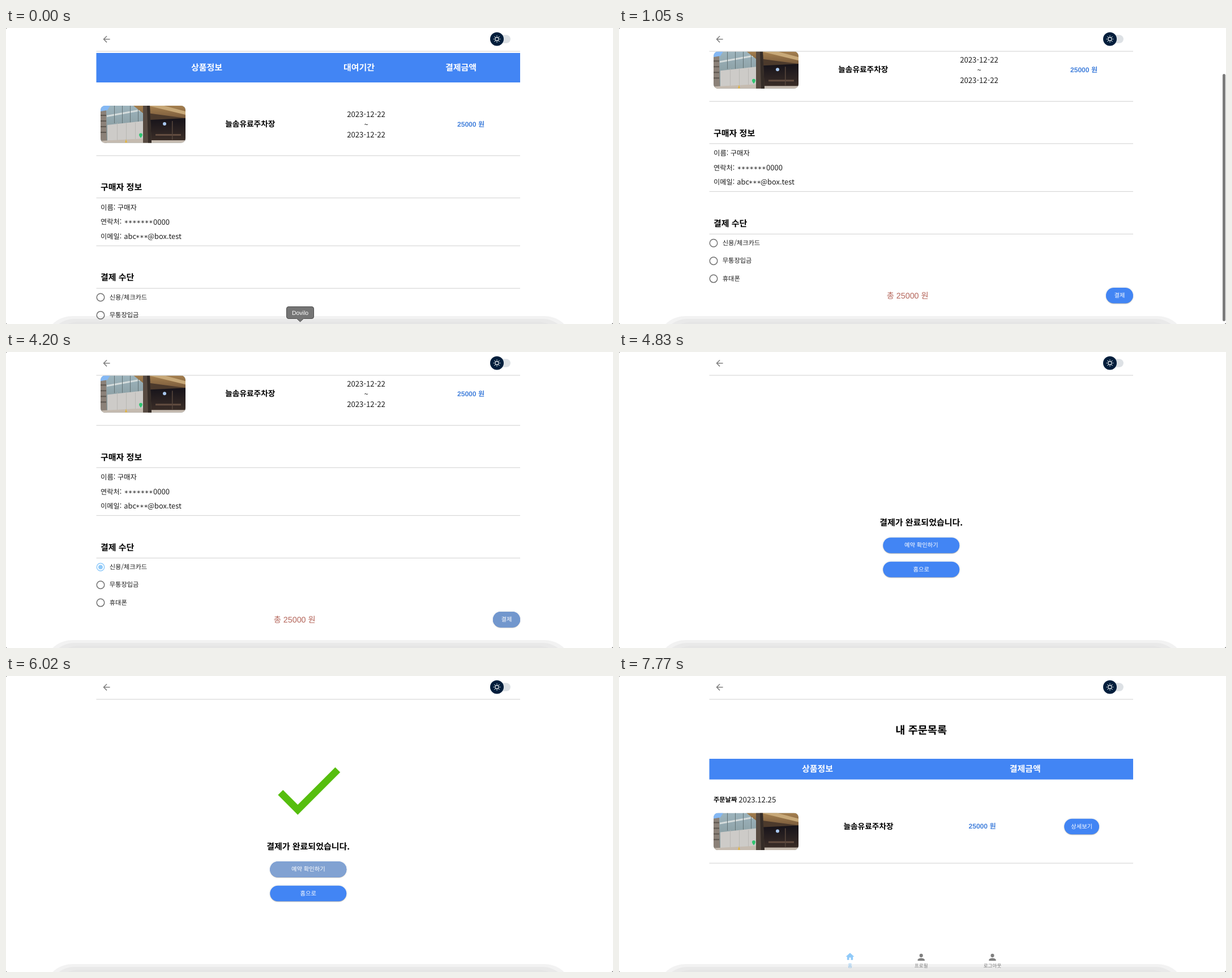
Animation, 1072 px wide and 522 px high, one loop 8 s. Source, as an HTML page:

```html
<!DOCTYPE html>
<html lang="ko">
<head>
<meta charset="utf-8">
<title>결제</title>
<style>
  html, body { margin: 0; width: 100%; height: 100%; overflow: hidden; background: #fff; }
  svg { display: block; width: 100%; height: 100%; font-family: "Noto Sans CJK KR", "Noto Sans CJK JP", "Noto Sans CJK", sans-serif; }
  text { white-space: pre; text-rendering: geometricPrecision; }
  .arial { font-family: "Liberation Sans", "Noto Sans CJK KR", sans-serif; }
  .mono { font-family: "DejaVu Sans Mono", monospace; }
  .raised { filter: drop-shadow(0 1px .6px rgba(0, 0, 0, .22)) drop-shadow(0 .7px 1.4px rgba(0, 0, 0, .16)); }
</style>
</head>
<body>
<svg id="stage" viewBox="0 0 1072 522" xmlns="http://www.w3.org/2000/svg"></svg>
<script>
const BLUE = '#4285f4', LIGHT = '#90caf9', GRAY = '#707070', PRICE = '#4582dc';
const LOT = '늘솜유료주차장';
const STEP = 70, LOOP = 8000, SCROLL = 95.7;

// Text placed by its vertical centre.
const text = (x, cy, size, str, { fill = '#1c1c1c', weight = 400, anchor = 'start', cls = '' } = {}) =>
  `<text x="${x}" y="${cy + size * .36}" font-size="${size}" fill="${fill}" font-weight="${weight}" text-anchor="${anchor}" class="${cls}">${str}</text>`;
const mid = (x, cy, size, str, opts = {}) => text(x, cy, size, str, { anchor: 'middle', ...opts });
const bold = (x, cy, size, str) => text(x, cy, size, str, { weight: 700, fill: '#000' });
const rect = (x, y, w, h, fill, rx = 0, extra = '') =>
  `<rect x="${x}" y="${y}" width="${w}" height="${h}" rx="${rx}" fill="${fill}" ${extra}/>`;
const rule = y => rect(159.5, y - .5, 748.5, 1.2, '#d8d8d8');
const icon = (cx, cy, scale, fill, d) =>
  `<path transform="translate(${cx - 12 * scale} ${cy - 12 * scale}) scale(${scale})" fill="${fill}" d="${d}"/>`;
const poly = (points, fill) => `<polygon points="${points}" fill="${fill}"/>`;
const gradient = (id, from, to) =>
  `<linearGradient id="${id}" x2="0" y2="1"><stop stop-color="${from}"/><stop offset="1" stop-color="${to}"/></linearGradient>`;

const button = (x, y, w, h, label, id = '') =>
  rect(x, y, w, h, BLUE, h / 2, 'class="raised"') +
  (id ? rect(x, y, w, h, '#7297cd', h / 2, `id="${id}Hover" opacity="0"`) +
        rect(x, y, w, h, '#fff', h / 2, `id="${id}Ripple" opacity="0"`) : '') +
  mid(x + w / 2, y + h / 2 - .3, 10.3, label, { fill: '#fff', weight: 500 });

const photo = (x, y) => `<g transform="translate(${x} ${y})" clip-path="url(#photoClip)">` +
  rect(0, 0, 150, 66, 'url(#glass)') +
  poly('0,8 10,8 11,66 0,66', '#8b8178') +
  [16, 26, 36, 46].map(ly => rect(0, ly, 10, 2, '#5d564f')).join('') +
  poly('0,0 17,0 12,8 0,10', '#84b8f4') +
  poly('11,17 78,5 78,8 11,20', '#d5dcdc') +
  [24, 38, 52, 66].map(lx => rect(lx, 0, 1, 31, '#647376')).join('') +
  poly('12,34 76,27 76,60 12,62', '#cdcbc8') +
  [29, 45, 61].map(lx => rect(lx, 30, .8, 31, '#b5b3b0')).join('') +
  poly('0,62 76,58 150,60 150,66 0,66', '#c5bbb0') +
  poly('58,0 150,0 150,28 88,28 76,14', 'url(#ceiling)') +
  poly('84,0 112,0 150,10 150,16', '#c7a878') +
  poly('76,12 90,14 150,22 150,27 88,26', '#4c3a2c') +
  poly('88,25 150,22 150,61 88,61', 'url(#entrance)') +
  rect(97, 50, 45, 3, '#634d40') + rect(126, 27, 1.5, 33, '#57473d') +
  poly('75,0 87,0 90,66 75,66', '#574a41') + poly('82,0 87,0 90,66 84,66', '#352c27') +
  '<circle cx="113" cy="32" r="3" fill="#a9c8f0"/>' +
  '<path d="M71 57q-3-4-3-5.500a3 3 0 0 1 6 0q0 1.500-3 5.500z" fill="#2fc571"/>' +
  poly('43,65 45,59 47,65', '#e5b53b') + '</g>';

const radio = (cy, label, id = '') =>
  `<circle ${id && `id="${id}"`} cx="167" cy="${cy}" r="6.750" fill="none" stroke="${GRAY}" stroke-width="1.500"/>` +
  text(182.7, cy - .3, 11.25, label, { weight: 500 });

const stars = (x, cy, count) =>
  text(x, cy + 2, 12, '*'.repeat(count), { cls: 'mono' });

const heads = (cy, list) =>
  list.map(([x, label]) => mid(x, cy, 15, label, { fill: '#fff', weight: 700 })).join('');

const price = (x, cy) => mid(x, cy, 12.1, '25000 원', { fill: PRICE, weight: 700, cls: 'arial' });

const checkout = rect(159.5, 44, 748.5, 52, BLUE) +
  heads(70, [[354.5, '상품정보'], [623.5, '대여기간'], [803.5, '결제금액']]) +
  photo(167, 137) +
  mid(431.3, 169, 13.7, LOT, { weight: 700, fill: '#000' }) +
  mid(636, 152, 13.2, '2023-12-22') + mid(636, 170, 13, '~') + mid(636, 188, 13.2, '2023-12-22') +
  price(821, 169.5) + rule(225) +
  bold(167, 281, 15, '구매자 정보') + rule(299.5) +
  text(167, 316.5, 12.4, '이름: 구매자') +
  text(167, 342, 12.2, '연락처:') + stars(208.8, 342, 7) + text(260, 342, 13, '0000') +
  text(167, 367.5, 12.2, '이메일:') + text(208.3, 367.5, 12.8, 'abc') + stars(229, 367.5, 3) +
  text(250, 367.5, 12.8, '@box.test') + rule(384) +
  bold(167, 440, 15, '결제 수단') + rule(459) +
  radio(475, '신용/체크카드', 'ring') +
  `<circle id="dot" cx="167" cy="475" r="0" fill="${LIGHT}"/>` +
  radio(506.4, '무통장입금') + radio(537.8, '휴대폰') +
  mid(509.7, 567.2, 14.3, '총 25000 원', { fill: '#b4655a', cls: 'arial' }) +
  button(860, 553.7, 48, 27.6, '결제', 'pay');

const done =
  '<path id="check" transform="translate(459 126) scale(6.250)" fill="#56be0e" d="M9 16.170 4.830 12l-1.420 1.410L9 19 21 7l-1.410-1.410z"/>' +
  mid(533.7, 301, 15, '결제가 완료되었습니다.', { weight: 700, fill: '#000' }) +
  button(466.3, 327.3, 135, 27.5, '예약 확인하기', 'view') +
  button(466.3, 369.7, 135, 27.5, '홈으로');

const PERSON = 'M12 12a4 4 0 1 0 0-8 4 4 0 0 0 0 8zm0 2c-2.670 0-8 1.340-8 4v2h16v-2c0-2.660-5.330-4-8-4z';
const orders = '<g id="list">' +
  mid(533.7, 95.2, 18.6, '내 주문목록', { weight: 700, fill: '#000' }) +
  rect(159.5, 146, 748.5, 36.5, BLUE) +
  heads(164, [[350.5, '상품정보'], [717.3, '결제금액']]) +
  bold(167, 218, 11.2, '주문날짜') + text(211.3, 218, 13.2, '2023.12.25') +
  photo(167, 241.5) +
  mid(440.5, 265, 13.7, LOT, { weight: 700, fill: '#000' }) +
  price(641.5, 265) + button(786.3, 251.7, 61.7, 27.5, '상세보기') + rule(330) + '</g>' +
  icon(408, 494.9, .74, LIGHT, 'M10 20v-6h4v6h5v-8h3L12 3 2 12h3v8z') +
  mid(408, 511.3, 8.7, '홈', { fill: LIGHT }) +
  [[533.7, '프로필'], [659.5, '로그아웃']].map(([x, label]) =>
    icon(x, 496, .77, '#808080', PERSON) + mid(x, 511.3, 8.6, label, { fill: '#808080' })).join('');

const rays = [...Array(8)].map((_, i) =>
  `<path d="M0-4.700v-1.550" transform="rotate(${i * 45})"/>`).join('');
const header = rect(0, 0, 1072, 40.5, '#fff') + rule(41) +
  icon(177.5, 19.8, .76, '#808080', 'M20 11H7.830l5.590-5.590L12 4l-8 8 8 8 1.410-1.410L7.830 13H20v-2z') +
  rect(859, 12.3, 32, 14.5, '#dde1e5', 7.2) +
  '<circle cx="867" cy="19.500" r="12" fill="#001e3c"/>' +
  `<g transform="translate(867 19.500)" fill="none" stroke="#fff" stroke-width="1.050"><circle r="3.130"/>${rays}</g>`;

const dock = [[67, 508, 934, 50, .05], [75, 513, 918, 45, .035], [87, 518, 894, 40, .015]]
  .map(([x, y, w, r, shade]) => rect(x, y, w, 110, '#000', r, `opacity="${shade}"`)).join('');

const tooltip = '<g id="tooltip">' +
  '<path d="M499 491.500h41q3.500 0 3.500 3.500v14q0 3.500-3.500 3.500h-14.500l-6 5.500-6-5.500h-14.500q-3.500 0-3.500-3.500v-14q0-3.500 3.500-3.500z" fill="#757575" stroke="#4c4c4c"/>' +
  mid(519.5, 502, 10.5, 'Dovilo', { fill: '#fff', cls: 'arial' }) + '</g>';

const corners = '<path d="M0 0h2q-2 0-2 2zM1072 522v-3q0 3-3 3zM0 522v-2q0 2 2 2z" fill="#333"/>';

document.getElementById('stage').innerHTML =
  '<defs><clipPath id="photoClip"><rect width="150" height="65.500" rx="8"/></clipPath>' +
  gradient('glass', '#9db4bd', '#7f9092') + gradient('ceiling', '#a5804f', '#6f5238') +
  gradient('entrance', '#16131a', '#3a2d27') + '</defs>' +
  `<g id="checkout">${checkout}</g><g id="done">${done}</g><g id="orders">${orders}</g>` +
  header + rect(1066, 0, 5, 436, '#7c7c7c', 2.5, 'id="bar"') + dock + tooltip + corners;

const $ = id => document.getElementById(id);
const set = (id, name, value) => $(id).setAttribute(name, value);
const show = (id, on) => set(id, 'display', on ? 'inline' : 'none');

// Progress that has already made its first step at `from` and is complete at `to`.
const ramp = (t, from, to) => Math.min(1, Math.max(0, (t - from + STEP) / (to - from + STEP)));
const easeOut = p => 1 - (1 - p) ** 3;
const smooth = p => p * p * (3 - 2 * p);
const pulse = p => Math.sin(Math.PI * p);

// [time, offset] of the small bounce of the order list
const BOUNCE = [[0, 0], [6930, -.9], [7000, -1], [7070, -.9], [7280, -.6], [7350, -.3], [7490, 0]];

function draw(time) {
  const t = Math.floor(time / STEP) * STEP;
  show('checkout', t < 4830);
  show('done', t >= 4830 && t < 6090);
  show('check', t >= 4900);
  show('orders', t >= 6090);

  set('tooltip', 'opacity', 1 - ramp(t, 70, 280));

  const scrolled = smooth(ramp(t, 910, 1050));
  set('checkout', 'transform', `translate(0 ${-SCROLL * scrolled})`);
  set('bar', 'y', 2 + 79 * scrolled);
  set('bar', 'opacity', t < 910 ? 0 : 1 - ramp(t, 1680, 1820));

  const picked = easeOut(ramp(t, 2800, 3220));
  set('ring', 'stroke', picked ? LIGHT : GRAY);
  set('dot', 'r', 3.9 * picked);

  set('payHover', 'opacity', smooth(ramp(t, 3780, 4200)));
  set('payRipple', 'opacity', .12 * pulse(ramp(t, 4270, 4550)));
  set('viewHover', 'opacity', smooth(ramp(t, 5530, 5950)));
  set('viewRipple', 'opacity', .12 * pulse(ramp(t, 5950, 6090)));

  const offset = BOUNCE.filter(([at]) => at <= t).pop()[1];
  set('list', 'transform', `translate(0 ${offset})`);
}

const start = performance.now();
function tick() {
  draw((performance.now() - start) % LOOP);
  requestAnimationFrame(tick);
}
tick();
</script>
</body>
</html>
```
